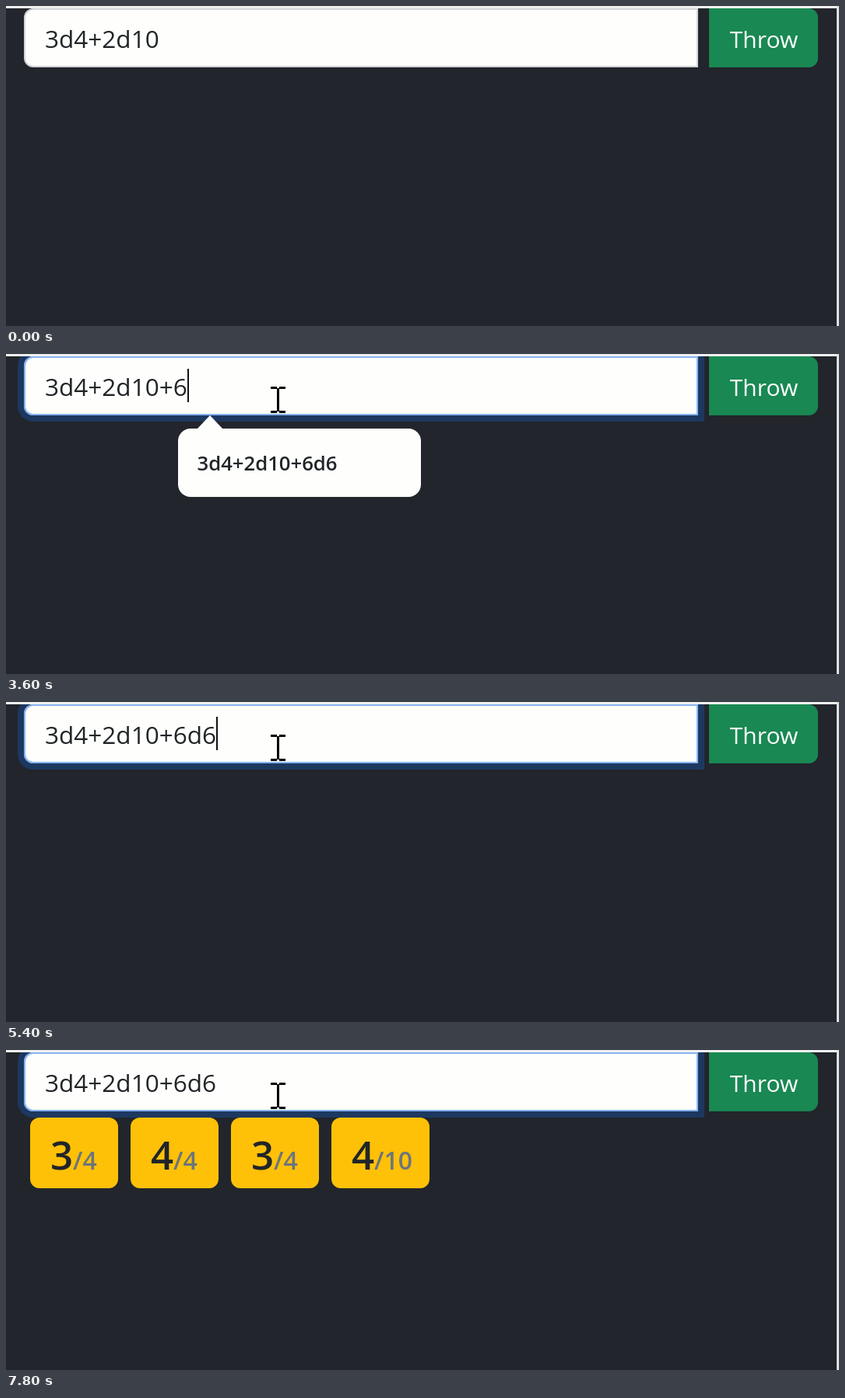
Recreate the animation shown at these times as an HTML page with a canvas. Size 1070 by 412 pixels, loop 8000 ms.

```html
<!DOCTYPE html>
<html lang="en">
<head>
<meta charset="utf-8">
<title>Dice thrower</title>
<style>
  html, body { margin: 0; width: 100%; height: 100%; overflow: hidden; background: #22252b; }
  canvas { display: block; width: 1070px; height: 412px; }
</style>
</head>
<body>
<canvas id="stage" width="1070" height="412"></canvas>
<script>
const ctx = document.getElementById('stage').getContext('2d');
const FONT = '"Open Sans", "Noto Sans", sans-serif';
const DARK = '#22252b', PAPER = '#fefffc', INK = '#212529';

const LOOP = 8000, TICK = 200, BLINK = 530;
const FOCUS = 120, THROW = 6300, DIE_DELAY = 500;
const FORMULA = '3d4+2d10+6d6', PREFILLED = 8;
const keys = [1700, 3590, 3950, 5060];
const POPUP_IN = 600, POPUP_OUT = 5400;

// The caret blink restarts on focus and on keys that follow a pause.
const restarts = [FOCUS, ...keys].filter((time, i, all) => !i || time - all[i - 1] > 1000);

// '3d4+2d10' becomes [4, 4, 4, 10, 10]
const dice = FORMULA.split('+').flatMap(term => {
  const [count, sides] = term.split('d').map(Number);
  return Array(count).fill(sides);
});

function rect(x, y, w, h, color) {
  ctx.fillStyle = color;
  ctx.fillRect(x, y, w, h);
}

function box(x, y, w, h, radii, color) {
  ctx.fillStyle = color;
  ctx.beginPath();
  ctx.roundRect(x, y, w, h, radii);
  ctx.fill();
}

function label(text, x, y, size, color, weight = 400, align = 'left') {
  ctx.font = `${weight} ${size}px ${FONT}`;
  ctx.textAlign = align;
  ctx.fillStyle = color;
  ctx.fillText(text, x, y);
  return ctx.measureText(text).width;
}

function drawWindow() {
  rect(0, 0, 1070, 412, DARK);
  rect(0, 0, 1070, 3, '#eef0ee');
  rect(1067, 0, 3, 412, '#dfe1e0');
}

function caretVisible(t) {
  const start = restarts.filter(time => time <= t).pop();
  return start !== undefined && Math.floor((t - start) / BLINK) % 2 === 0;
}

function drawField(t) {
  const focus = Math.min(1, Math.max(0, (t - FOCUS) / 150));
  const layer = (alpha, inset, radius, color) => {
    ctx.globalAlpha = alpha;
    box(23 + inset, 3 + inset, 866 - 2 * inset, 76 - 2 * inset, [radius, 0, 0, radius], color);
  };
  ctx.save();
  ctx.beginPath();
  ctx.rect(0, 3, 1067, 409);
  ctx.clip();
  layer(focus, -8, 20, '#1d3860');
  layer(1, 0, 12, '#d3d6d8');
  layer(focus, 0, 12, '#86b4f2');
  layer(1, 2, 10, PAPER);
  ctx.restore();

  const typed = PREFILLED + keys.filter(time => time <= t).length;
  const width = label(FORMULA.slice(0, typed), 50, 54, 31.5, INK);
  if (caretVisible(t)) rect(Math.round(50 + width), 19, 2, 43, '#111');
}

function drawButton() {
  box(903, 3, 140, 76, [0, 12, 12, 0], '#198853');
  label('Throw', 973.5, 54, 30, '#fff', 400, 'center');
}

function drawSuggestion() {
  box(221, 96, 312, 88, 16, PAPER);
  ctx.beginPath();
  ctx.moveTo(245, 97);
  ctx.lineTo(262, 79);
  ctx.lineTo(279, 97);
  ctx.fill();
  label(FORMULA, 245.5, 150, 25.7, INK, 600);
}

function drawPointer() {
  for (const y of [42, 73]) {
    rect(340, y, 8, 3, '#000');
    rect(351, y, 8, 3, '#000');
  }
  rect(348, 44, 3, 30, '#000');
}

function drawDice(t) {
  const thrown = t < THROW ? 0 : 1 + Math.floor((t - THROW) / DIE_DELAY);
  let x = 31;
  dice.slice(0, thrown).forEach((sides, i) => {
    const width = 100 + 13 * String(sides).length;
    box(x, 87, width, 91, 12, '#ffc107');
    label(3 + i % 2, x + 26, 154, 51, INK, 600);
    label('/' + sides, x + 55, 154, 32, '#6c757d', 600);
    x += width + 16;
  });
}

function draw(now) {
  const t = Math.floor(now % LOOP / TICK) * TICK;
  drawWindow();
  drawField(t);
  drawButton();
  if (t >= POPUP_IN && t < POPUP_OUT) drawSuggestion();
  drawDice(t);
  if (t >= FOCUS) drawPointer();
}

const origin = performance.now();
function frame() {
  draw(performance.now() - origin);
  requestAnimationFrame(frame);
}
frame();
</script>
</body>
</html>
```
